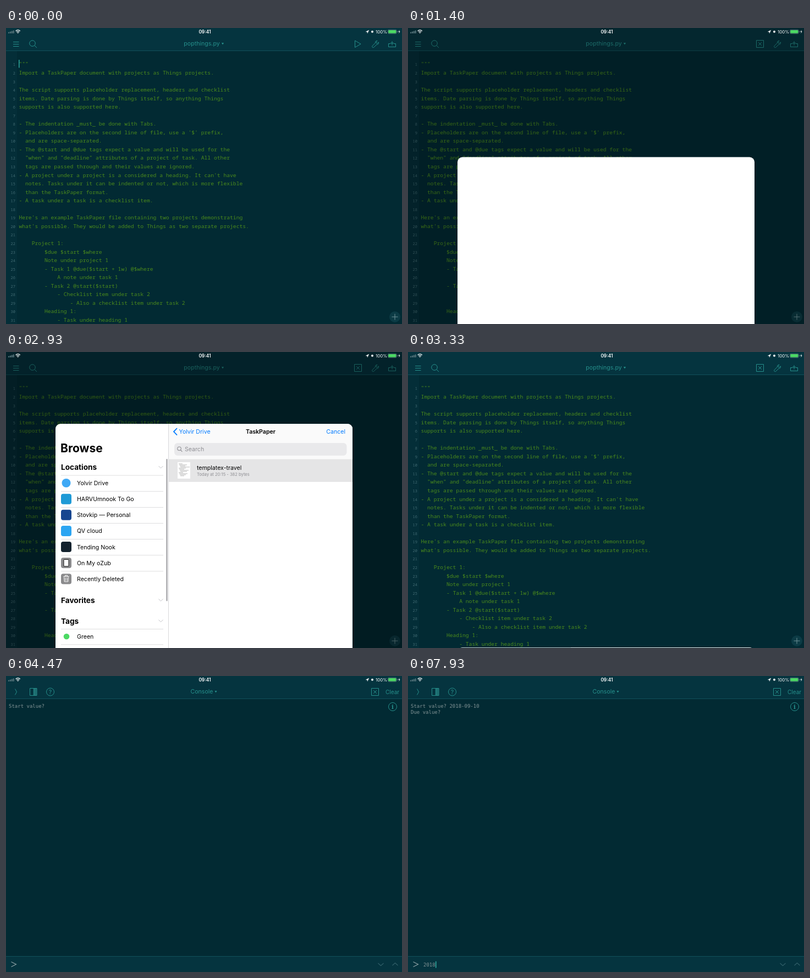
Recreate the animation shown at these times as an HTML page. Size 720x540 px, loop 8000 ms.

```html
<!DOCTYPE html>
<html lang="en">
<head>
<meta charset="utf-8">
<title>Editor and console</title>
<style>
html, body { margin: 0; width: 100%; height: 100%; overflow: hidden; background: #022a33; }
svg { display: block; width: 100vw; height: 100vh; }
text { white-space: pre; font-family: Inter, "Liberation Sans", sans-serif; }
.code { font: 9.7px "Noto Sans Mono", "DejaVu Sans Mono", monospace; fill: #4b8a1c; }
.num { font: 7px "Noto Sans Mono", monospace; fill: #416a72; text-anchor: end; }
.out { font: 9px "DejaVu Sans Mono", monospace; fill: #839496; }
.icon { fill: none; stroke: #26908c; stroke-width: 1; }
.teal { fill: #26908c; }
</style>
</head>
<body>
<svg id="stage" viewBox="0 0 720 540"></svg>
<script>
const LOOP = 8000;
const BG = '#022a33', BAR = '#05343f', LINE = '#11505a', BLUE = '#007aff', GREY = '#8e8e93';

const DOC = `"""
Import a TaskPaper document with projects as Things projects.

The script supports placeholder replacement, headers and checklist
items. Date parsing is done by Things itself, so anything Things
supports is also supported here.

- The indentation _must_ be done with Tabs.
- Placeholders are on the second line of file, use a '$' prefix,
  and are space-separated.
- The @start and @due tags expect a value and will be used for the
  "when" and "deadline" attributes of a project of task. All other
  tags are passed through and their values are ignored.
- A project under a project is a considered a heading. It can't have
  notes. Tasks under it can be indented or not, which is more flexible
  than the TaskPaper format.
- A task under a task is a checklist item.

Here's an example TaskPaper file containing two projects demonstrating
what's possible. They would be added to Things as two separate projects.

    Project 1:
        $due $start $where
        Note under project 1
        - Task 1 @due($start + 1w) @$where
            A note under task 1
        - Task 2 @start($start)
            - Checklist item under task 2
                - Also a checklist item under task 2
        Heading 1:
            - Task under heading 1`.split('\n');

const PLACES = [
  ['Yolvir Drive', '#3fa9f5'],
  ['HARVUmnook To Go', '#1e9ad6'],
  ['Stovkip — Personal', '#17468f'],
  ['QV cloud', '#2ba5f2'],
  ['Tending Nook', '#13222e'],
  ['On My oZub', '#8a8a8c'],
  ['Recently Deleted', '#8a8a8c']
];

function add(parent, tag, attrs = {}, content) {
  const el = document.createElementNS('http://www.w3.org/2000/svg', tag);
  for (const k in attrs) el.setAttribute(k, attrs[k]);
  if (content !== undefined) el.textContent = content;
  return parent.appendChild(el);
}
const group = (p, attrs) => add(p, 'g', attrs);
const rect = (p, x, y, width, height, fill, rx = 0) => add(p, 'rect', { x, y, width, height, fill, rx });
const circle = (p, cx, cy, r, attrs) => add(p, 'circle', { cx, cy, r, ...attrs });
const path = (p, d, attrs = { class: 'icon' }) => add(p, 'path', { d, ...attrs });
const label = (p, x, y, size, fill, str, attrs = {}) =>
  add(p, 'text', { x, y, 'font-size': size, fill, ...attrs }, str);
const stroke = (color, width = 1) => ({ fill: 'none', stroke: color, 'stroke-width': width });
const mid = { 'text-anchor': 'middle' };

function page(parent) {
  const g = group(parent);
  rect(g, 0, 0, 720, 540, BG);
  rect(g, 0, 0, 720, 41, BAR);
  rect(g, 0, 41, 720, 1, LINE);
  return g;
}

function heading(g, x, str, arrow) {
  label(g, x, 32, 10.6, '#26908c', str, mid);
  path(g, `M${arrow - 2} 27h4l-2 3.4z`, { class: 'teal' });
}

const stopIcon = (g, x) =>
  path(g, `M${x - 6.5} 22.5h13v13h-13zM${x - 2.8} 26.2l5.6 5.6m0-5.6l-5.6 5.6`);

function buildEditor(root) {
  const g = page(root);
  rect(g, 0, 42, 20, 498, '#042e38');
  path(g, 'M13 25.5h10.5M13 29.5h10.5M13 33.5h10.5');
  circle(g, 48, 28, 5.3, { class: 'icon' });
  path(g, 'M52 32l4 4');
  heading(g, 356, 'popthings.py', 394);
  const play = path(g, 'M634.5 23v12.4l10.6-6.2z');
  const stop = group(g);
  stopIcon(stop, 640);
  path(g, 'M675 23.3l-2 2.2 .4 2 2 .4 2.1-2c.6 2.2-.9 4.4-3.4 4.1l-5 5c-.9.9-2.3.9-2.9.2s-.7-2 .2-2.9l5-5c-.3-2.6 1.7-4.4 3.6-4z');
  path(g, 'M699 28.5h-3.500v6h13v-6h-3.500M702 24v7.500M699 27.500h6');
  DOC.forEach((line, i) => {
    const y = 69.4 + i * 15.55;
    add(g, 'text', { x: 17, y, class: 'num' }, i + 1);
    add(g, 'text', { x: 23.4, y, class: 'code' }, line);
  });
  const caret = rect(g, 23, 58, 1.6, 14.5, '#2aa198');
  circle(g, 707, 527, 10, { fill: '#0c3b45' });
  path(g, 'M701.5 527h11M707 521.5v11', stroke('#6f9298'));
  return { g, play, stop, caret };
}

function buildConsole(root) {
  const g = page(root);
  path(g, 'M16.500 23.500l3 5.500-3 5.500');
  path(g, 'M43.500 22.500h12.500v13h-12.500z');
  rect(g, 51, 23, 5, 12, '#1d6f71');
  path(g, 'M50.500 23v12');
  circle(g, 80.500, 29, 7, { class: 'icon' });
  label(g, 80.500, 32.800, 10.5, '#26908c', '?', mid);
  heading(g, 356, 'Console', 381.5);
  stopIcon(g, 671);
  label(g, 690, 32.500, 10, '#26908c', 'Clear');
  circle(g, 703, 56, 7.500, { class: 'icon' });
  label(g, 703, 60, 11, '#26908c', 'i',
    { ...mid, style: 'font-family:"Noto Serif",serif;font-weight:bold' });
  const out = [58, 69].map(y => add(g, 'text', { x: 5, y, class: 'out' }));
  rect(g, 0, 511, 720, 29, BAR);
  rect(g, 0, 511, 720, 1, LINE);
  path(g, 'M9.500 521.500l9 4.500-9 4.500', stroke('#93a6a9', 1.1));
  path(g, 'M676.500 524l5 4.500 5-4.500M702.500 528l5-4.500 5 4.500', stroke('#315f69', 1.1));
  const input = add(g, 'text', { x: 28, y: 530, class: 'out' });
  const caret = rect(g, 28, 520.5, 1.700, 12, '#2aa198');
  return { g, out, input, caret };
}

function buildStatus(root) {
  const g = group(root);
  for (let i = 0; i < 4; i++) {
    rect(g, 4 + i * 2.900, 7.400 - i, 2.100, 2.400 + i, '#57757c', .4);
  }
  path(g, 'M17.600 5.500q4.100-3.700 8.200 0M19.200 7.400q2.500-2.200 5 0', stroke('#fff', 1.200));
  path(g, 'M20.400 8.500q1.300-1 2.600 0l-1.300 1.500z', { fill: '#fff' });
  label(g, 361.500, 9.800, 8.300, '#fff', '09:41', { ...mid, 'font-weight': 600 });
  path(g, 'M654.300 6.800l5.500-2.800-2.600 5.600-.4-2.500z', { fill: '#fff', stroke: '#fff', 'stroke-width': .4 });
  circle(g, 666, 6.700, 2, { fill: '#fff' });
  label(g, 672, 9.800, 8, '#fff', '100%');
  add(g, 'rect', { x: 694.500, y: 3.200, width: 15.500, height: 7, rx: 1.500, ...stroke('#7f979c', .6) });
  rect(g, 695.300, 4, 13.900, 5.400, '#4cd964', .8);
  rect(g, 710.800, 5.500, .9, 2.400, '#7f979c');
  path(g, 'M715.600 3.500l-2.200 3.600h1.500l-.6 3 2.300-3.800h-1.500z', { fill: '#fff' });
}

function section(g, y, title) {
  label(g, 100, y + 5, 13.600, '#000', title, { 'font-weight': 700 });
  path(g, `M277.500 ${y - 2}l4 4 4-4`, stroke('#c4c4c8'));
}

const rule = (g, y) => rect(g, 100, y, 186, .7, '#cfcfd2');

function buildSheet(root) {
  const g = group(root);
  rect(g, 90, 131, 540, 430, '#fff', 9);
  const body = group(g);

  label(body, 99, 183, 21, '#000', 'Browse', { 'font-weight': 700 });
  section(body, 210, 'Locations');
  PLACES.forEach(([name, color], i) => {
    const y = 239 + i * 29.15;
    rule(body, y - 14.300);
    if (i) rect(body, 100, y - 9.500, 19, 19, color, 4);
    else circle(body, 109.5, y, 8, { fill: color });
    label(body, 129, y + 3.900, 10.600, '#000', name);
  });
  // tablet and bin glyphs
  add(body, 'rect', { x: 105, y: 378.500, width: 9, height: 12.500, rx: 1, fill: '#fff', stroke: '#111', 'stroke-width': 1 });
  path(body, 'M104.500 409.500h10M107.500 409v-1.500h4v1.500M105.500 410.500l.7 8.500h6.600l.7-8.500M108 411.500v6M111 411.500v6', stroke('#fff'));
  section(body, 452.500, 'Favorites');
  section(body, 490.500, 'Tags');
  rule(body, 505);
  circle(body, 110, 519, 5.300, { fill: '#4cd964' });
  label(body, 129, 523, 10.600, '#000', 'Green');
  rule(body, 533.500);
  rect(body, 291.500, 195, 2, 259.500, '#98989b', 1);
  rect(body, 295, 131, .8, 420, '#cfcfd2');

  path(body, 'M296 131h325a9 9 0 0 1 9 9v55.500h-334z', { fill: '#fafafa' });
  path(body, 'M311 139l-6 6.300 6 6.300', stroke(BLUE, 1.800));
  label(body, 314.500, 149.200, 10.600, BLUE, 'Yolvir Drive');
  label(body, 463, 149.200, 10.600, '#000', 'TaskPaper', { ...mid, 'font-weight': 600 });
  label(body, 617, 149.200, 10.600, BLUE, 'Cancel', { 'text-anchor': 'end' });
  rect(body, 306, 166, 313.500, 23, '#e9e9eb', 6);
  circle(body, 315, 176.300, 3.300, stroke(GREY, 1.100));
  path(body, 'M317.400 178.800l3 3', stroke(GREY, 1.200));
  label(body, 325, 181, 10.600, GREY, 'Search');
  const row = rect(body, 295.800, 195.500, 334.200, 41.500, '#e5e5e6');
  rect(body, 312, 201, 23, 30, '#fff');
  for (let i = 0; i < 12; i++) {
    rect(body, 314 + i % 4, 203.500 + i * 2, 7 + i * 7 % 11, .8, '#a9a9a9');
  }
  label(body, 347, 215.300, 10.600, '#000', 'templatex-travel');
  label(body, 347, 226, 7.600, GREY, 'Today at 20:15 - 382 bytes');
  return { g, body, row };
}

const svg = document.getElementById('stage');
const editor = buildEditor(svg);
const term = buildConsole(svg);
const dim = rect(svg, 0, 0, 720, 540, '#000');
const sheet = buildSheet(svg);
buildStatus(svg);

const START = '2018-09-10';
const KEYS = [5400, 5600, 5780, 5950, 6130, 6270, 6400, 6540, 6740, 6900];
const DUE_KEYS = [7480, 7600, 7730, 7860];
const ENTER = 7250, RUN = 1000, CHAR = 5.42;

const span = (t, start, dur) => Math.min(1, Math.max(0, (t - start) / dur));
const easeOut = u => 1 - (1 - u) ** 3;
const easeInOut = u => u * u * (3 - 2 * u);
const show = (el, on) => el.setAttribute('visibility', on ? 'visible' : 'hidden');
const move = (el, x, y) => el.setAttribute('transform', `translate(${x} ${y})`);
const write = (el, str) => { if (el.textContent !== str) el.textContent = str; };

function render(t) {
  show(editor.caret, t < 500);
  show(editor.play, t < RUN);
  show(editor.stop, t >= RUN);

  const open = easeOut(span(t, 1200, 550)) - easeOut(span(t, 2990, 390));
  dim.setAttribute('opacity', .34 * open);
  show(sheet.g, open > 0);
  move(sheet.g, 0, 409 * (1 - open));
  sheet.body.setAttribute('opacity', t < 1730 ? 0 : 1);
  sheet.row.setAttribute('opacity', t < 2800 ? 0 : 1);

  const slide = easeInOut(span(t, 3650, 350));
  move(editor.g, -720 * slide, 0);
  move(term.g, 720 * (1 - slide), 0);

  const sent = t >= ENTER;
  const count = (sent ? DUE_KEYS : KEYS).filter(k => k <= t).length;
  write(term.out[0], 'Start value? ' + (sent ? START : ''));
  write(term.out[1], sent ? 'Due value?' : '');
  write(term.input, START.slice(0, count));
  term.caret.setAttribute('x', 28.200 + count * CHAR);
  show(term.caret, t >= 4900);
}

const begin = performance.now();
function tick() {
  render((performance.now() - begin) % LOOP);
  requestAnimationFrame(tick);
}
tick();
</script>
</body>
</html>
```
